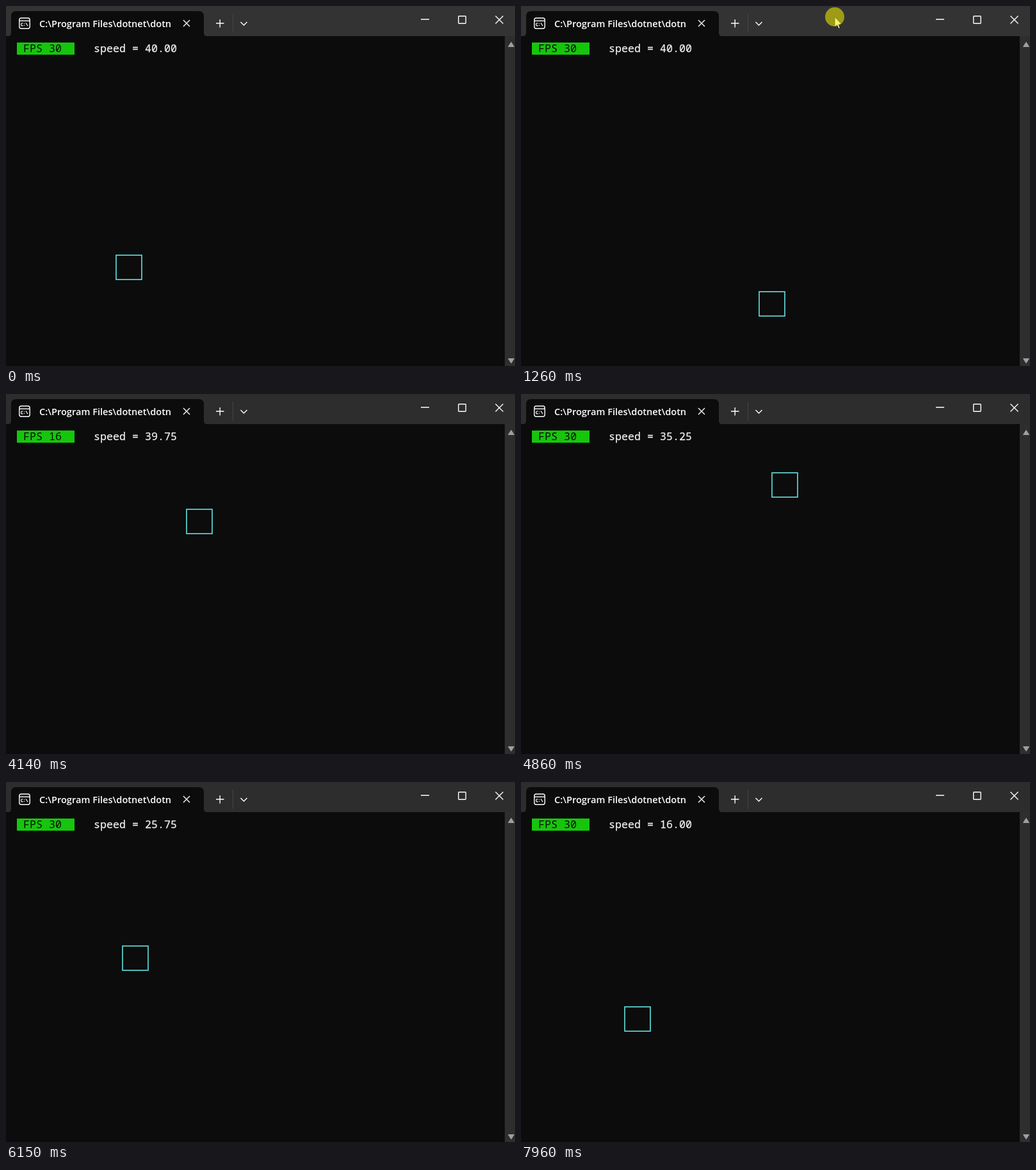
These frames come from a looping animation (795x562 px, 7.99 s). An HTML page:

```html
<!DOCTYPE html>
<html lang="en">
<head>
<meta charset="utf-8">
<title>Console orbit</title>
<style>
  html, body { margin: 0; width: 100%; height: 100%; overflow: hidden; background: #0c0c0c; }
  svg { display: block; width: 795px; height: 562px; }
  .title { font: 600 14.6px "Open Sans", "Noto Sans", sans-serif; fill: #fff; }
  .mono { font: 500 16.667px "Noto Sans Mono", "DejaVu Sans Mono", monospace; white-space: pre; }
  .line { fill: none; stroke: #fff; stroke-width: 1.4; }
</style>
</head>
<body>
<svg viewBox="0 0 795 562">
  <rect width="795" height="562" fill="#0c0c0c"/>
  <rect id="bar" width="795" height="47" fill="#333"/>
  <path d="M3 47q5 0 5-5V16q0-8 8-8H301q8 0 8 8V42q0 5 5 5z" fill="#0c0c0c"/>

  <g class="line">
    <rect x="20.8" y="18.8" width="16.4" height="16.4" rx="3"/>
    <path d="M21 23.2H37"/>
    <path d="M26.6 27q-3-1-3 1.8t3 1.8M28.6 27.3v.9M28.6 30v.9M31 26.3l3 5" stroke-width="1.2"/>
    <path d="M277 22l10 10M287 22l-10 10"/>
    <path d="M328 27h12.5M334.2 21v12.5"/>
    <path d="M366.5 25l5 5 5-5"/>
    <path d="M648 20.8h13M764.5 15.5l12 12M776.5 15.5l-12 12"/>
    <rect x="706.7" y="15.7" width="11.5" height="11.5" rx="1"/>
  </g>
  <path d="M354.500 12V42" stroke="#444"/>
  <text class="title" x="52" y="33">C:\Program Files\dotnet\dotn</text>

  <rect x="779" y="47" width="16" height="515" fill="#2e2e2e"/>
  <g fill="#9f9f9f" stroke="#9f9f9f" stroke-linejoin="round">
    <path d="M789 56.5l4.5 7h-9z"/>
    <path d="M789 557.5l4.5-7h-9z"/>
  </g>

  <rect x="17" y="57" width="90" height="19" fill="#16c60c"/>
  <text class="mono" id="fps" x="27" y="72" fill="#0c0c0c"></text>
  <text class="mono" id="speed" x="137" y="72" fill="#f2f2f2" stroke="#f2f2f2" stroke-width=".25"></text>

  <rect id="box" x="1" y="1" width="40" height="38" fill="none" stroke="#61d6d6" stroke-width="1.7"/>

  <g id="pointer">
    <path d="M0 0V16l3.600-3.400 2.500 5.800 2.400-1-2.500-5.700H11z" fill="#fff" stroke="#111"/>
    <circle r="15" fill="#f3ee01" fill-opacity=".56"/>
  </g>
</svg>
<script>
const LOOP = 7990;
const TURN = 2 * Math.PI;
const CELL = { w: 10, h: 19 };
const CENTER = { col: 35, row: 12.5 };
const ASPECT = 2;        // row height in columns
const SPIN = 0.0058;     // typical radians per ms

const el = id => document.getElementById(id);
const [bar, fps, speed, box, pointer] = ['bar', 'fps', 'speed', 'box', 'pointer'].map(el);

const stalls = [{ from: 2030, to: 2800 }, { from: 3290, to: 3770 }, { from: 6980, to: 7070 }];
const runningTime = t => stalls.reduce(
  (sum, { from, to }) => sum - Math.min(to - from, Math.max(0, t - from)), t);

const poses = [
  { t: 0, col: 17, row: 20, speed: 40 },
  { t: 1260, col: 37, row: 23, speed: 40 },
  { t: 2830, col: 19, row: 15, speed: 40 },
  { t: 4140, col: 28, row: 9, speed: 39.75 },
  { t: 5560, col: 54, row: 12, speed: 30.5 },
  { t: 6700, col: 49, row: 14, speed: 21.25 },
  { t: 7960, col: 16, row: 18, speed: 16 }
];

const pointerPath = [
  { t: 240, x: 533, y: 534 },
  { t: 800, x: 533, y: 166 },
  { t: 1260, x: 490, y: 17 },
  { t: 1600, x: 486, y: 17 },
  { t: 2030, x: 223, y: 14 }
];

// Polar form of each pose; the box circles anticlockwise, with whole turns chosen to suit SPIN.
poses.forEach((pose, i) => {
  const dx = pose.col - CENTER.col, dy = (pose.row - CENTER.row) * ASPECT;
  pose.run = runningTime(pose.t);
  pose.radius = Math.hypot(dx, dy);
  pose.angle = Math.atan2(dy, dx);
  if (i === 0) return;
  const last = poses[i - 1];
  const expected = last.angle - SPIN * (pose.run - last.run);
  pose.angle += TURN * Math.round((expected - pose.angle) / TURN);
});

function between(keys, time, clock, prop) {
  const next = keys.findIndex(key => key[clock] > time);
  if (next === 0) return keys[0][prop];
  if (next < 0) return keys[keys.length - 1][prop];
  const a = keys[next - 1], b = keys[next];
  return a[prop] + (b[prop] - a[prop]) * (time - a[clock]) / (b[clock] - a[clock]);
}

const place = (node, x, y) => node.setAttribute('transform', `translate(${x} ${y})`);

function draw(t) {
  const run = runningTime(t);
  const radius = between(poses, run, 'run', 'radius');
  const angle = between(poses, run, 'run', 'angle');
  const col = Math.round(CENTER.col + radius * Math.cos(angle));
  const row = Math.round(CENTER.row + radius * Math.sin(angle) / ASPECT);
  place(box, 1 + CELL.w * col, 8 + CELL.h * row);

  const hovering = t >= 240 && t < 2030;
  pointer.setAttribute('visibility', hovering ? 'visible' : 'hidden');
  place(pointer, between(pointerPath, t, 't', 'x'), between(pointerPath, t, 't', 'y'));

  bar.setAttribute('fill', t < 2030 ? '#333' : '#2d2d2d');
  fps.textContent = `FPS ${t >= 3200 && t < 4300 ? 16 : 30}`;
  const value = Math.ceil(between(poses, t, 't', 'speed') * 4) / 4;
  speed.textContent = `speed = ${value.toFixed(2)}`;
}

const start = performance.now();
function tick() {
  draw((performance.now() - start) % LOOP);
  requestAnimationFrame(tick);
}
tick();
</script>
</body>
</html>
```
